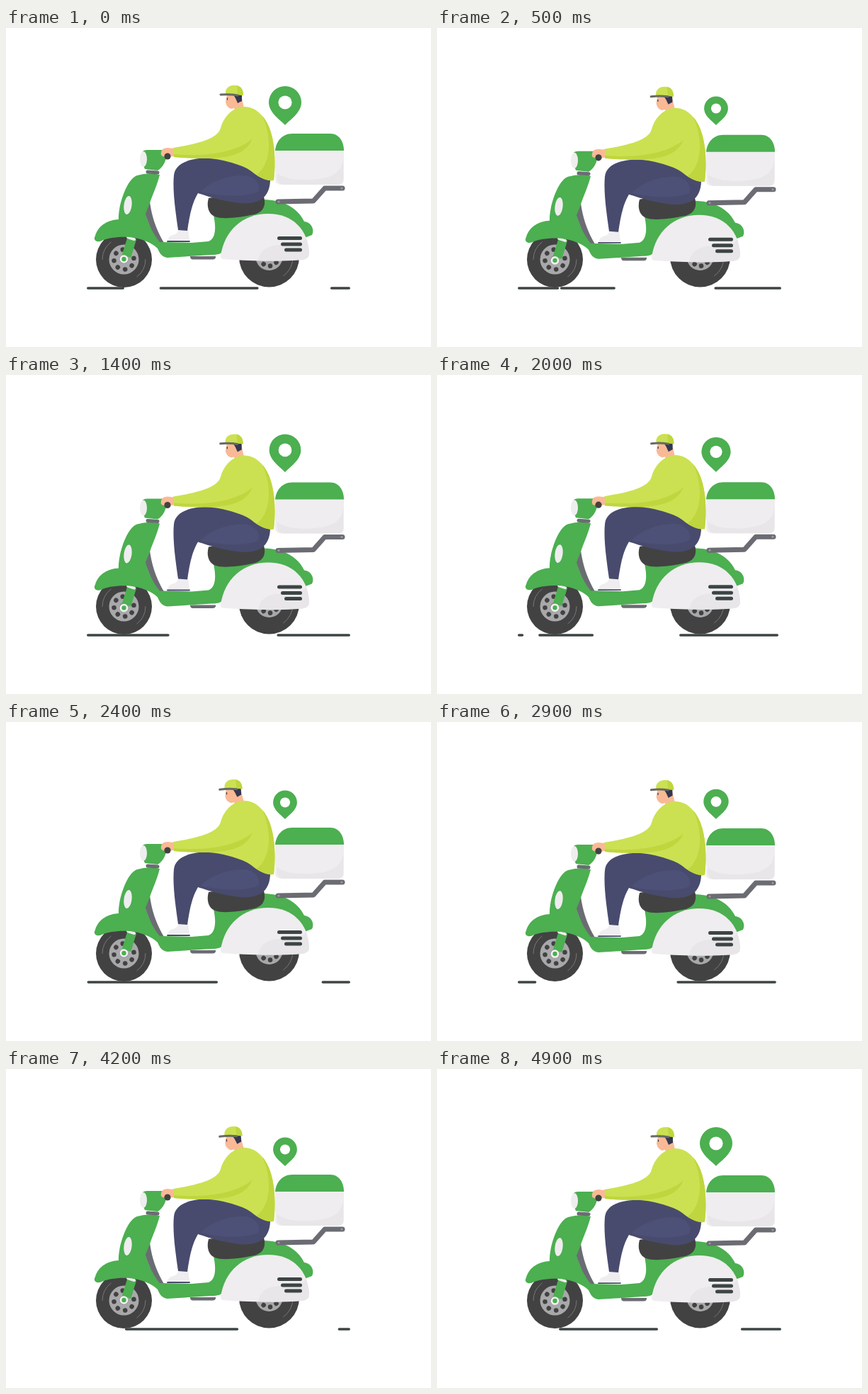
Write an HTML page that moves like this. It is 600 px wide and 450 px high and loops after 5000 ms.

```html
<!DOCTYPE html>
<html lang="en">
<head>
<meta charset="utf-8">
<title>Scooter delivery</title>
<style>
html, body { margin: 0; width: 100%; height: 100%; overflow: hidden; background: #fff; }
svg { display: block; width: 100vw; height: 100vh; }
.green { fill: #4caf50; }
.lime { fill: #cbe152; }
.olive { fill: #bfd63e; }
.dark { fill: #424242; }
.white { fill: #efedef; }
.shade { fill: #e8e6e8; }
.skin { fill: #f9b995; }
.navy { fill: #484b6d; }
.grey { fill: #6b6c73; }
.line { fill: none; stroke-linecap: round; stroke-linejoin: round; }
</style>
</head>
<body>
<svg viewBox="0 0 600 450">
  <path id="road" class="line" stroke="#3d4544" stroke-width="3.6"/>

  <g id="rear" transform="translate(371.5 323)"></g>
  <g id="front" transform="translate(166.5 326.5)"></g>

  <g id="pin" class="green">
    <path d="M394 137C389 131 371 120 371 105A23 23 0 0 1 417 105C417 120 399 131 394 137Z"/>
    <circle cx="394" cy="105" r="9.6" fill="#fff"/>
  </g>

  <g id="bike">
    <!-- box -->
    <path class="white" d="M380 172H477V213Q477 221 468 221H389Q380 221 380 213Z"/>
    <path class="shade" d="M476 179C477 200 466 212 430 214C408 215 392 212 383 205C381 215 386 221 392 221H468Q477 221 476 213Z"/>
    <path class="green" d="M380 173C381 160 390 149 404 149H458C470 149 477 160 477 173Z"/>

    <!-- fork -->
    <path stroke="#4caf50" stroke-width="13" d="M178 296L170 322"/>
    <path class="line" stroke="#efedef" stroke-width="4" d="M172 295L181 298"/>
    <circle cx="166.5" cy="326" r="4.5" fill="#4caf50" stroke="#f4f4f4" stroke-width="2.6"/>

    <!-- body -->
    <path class="grey" d="M260 322H296V324Q295 326.500 292 326.500H263Q260 326 260 322Z"/>
    <path class="grey" d="M203 245L196 262L212 303H223C213 286 206 268 203 245Z"/>
    <path class="green" d="M185 208Q202 203 217 207C214 220 207 235 203 247L197 262C201 277 208 291 217 302L262 303L286 301C296 297 297 282 293 264L340 250L365 242C392 243 412 254 421 273C431 274 436 284 432 292L424 295L400 305L310 312C304 319 299 320 290 320L228 324C220 323 217 318 214 311C205 302 190 297 175 295C158 294 143 296 133 301C126 302 123 298 126 293C131 277 145 271 159 270C158 252 170 213 185 208Z"/>
    <path class="line" stroke="#6b6c73" stroke-width="5" d="M200 203L214 204"/>
    <path class="green" d="M193 174Q195 172 199 172H221Q229 174 227 181C224 191 221 197 214 201L196 199Q190 186 193 174Z"/>
    <ellipse class="white" cx="194" cy="185" rx="5" ry="11"/>
    <ellipse class="white" cx="172" cy="250" rx="5.500" ry="13" transform="rotate(7 172 250)"/>
    <path class="white" d="M303 322C308 285 335 262 370 262C405 262 427 285 428 318Q428 326 418 327C380 329 340 329 306 326Q303 325 303 322Z"/>
    <path class="shade" d="M424 296C426 304 428 312 428 318Q428 326 418 327C395 329 375 329 356 328C359 312 372 306 388 306C407 306 419 305 424 296Z"/>
    <path class="line" stroke="#3d4544" stroke-width="5" d="M385.500 296.500H415.500M390.500 305H415.500M395.500 313H415.500"/>

    <!-- rack -->
    <path class="line" stroke="#6b6c73" stroke-width="7" d="M384 245L434 244L450 226H475"/>
    <circle cx="474" cy="226" r="1.6" fill="#999"/>
    <circle cx="385" cy="245" r="1.6" fill="#999"/>

    <!-- seat, leg, shoe -->
    <path class="dark" d="M286 240C300 236 350 240 364 238C368 252 362 262 345 264C325 268 305 270 295 266C285 262 283 250 286 240Z"/>
    <path class="white" d="M244 283H257L259 299L229 300Q228 294 236 292Q243 290 244 283Z"/>
    <path class="line" stroke="#484b6d" stroke-width="1.8" d="M228 301H259"/>
    <path class="navy" d="M297 184C268 182 239 187 237 208C235 228 239 258 243 285L256 286C259 266 262 248 271 233C287 238 300 243 330 247C352 249 372 243 373 215L340 188Z"/>
    <path fill="#4e5177" d="M275 231C288 216 315 207 338 208C352 210 360 221 356 231C335 240 300 237 275 231Z"/>

    <g id="head">
      <path class="skin" d="M312 94L310 104Q311 112 318 114L322 113L324 119L336 113L332 94Z"/>
      <path fill="#343750" d="M321 94H333V103L327 106L324 99Z"/>
      <path class="line" stroke="#343750" stroke-width="1.3" d="M312.500 99V101"/>
      <path class="lime" d="M310 93C309 84 317 80 324 81C333 82 335 88 335 95Z"/>
      <path class="olive" d="M326 81C333 83 335 88 335 95L327 94Z"/>
      <path class="line" stroke="#666b61" stroke-width="3" d="M303 94Q316 93 327 95"/>
    </g>

    <!-- shirt and hand -->
    <path class="lime" d="M333 111C318 114 307 126 303 141C299 156 273 163 236 169L237 182C262 185 280 182 296 185C315 188 340 195 350 205C358 211 368 216 378 215C381 190 381 150 365 128C356 115 345 110 333 111Z"/>
    <path class="olive" d="M362 124C381 146 381 190 378 215C368 216 360 212 354 207C374 192 376 156 362 124ZM237 178C280 182 325 176 348 156C338 181 308 188 237 182Z"/>
    <path class="skin" d="M219 175Q220 169 228 169L237 170V181L226 182Q217 182 219 175Z"/>
    <circle class="dark" cx="228" cy="181" r="4.6"/>
  </g>
</svg>
<script>
const LOOP = 5000, STEP = 100, CYCLES = 3, BUMPS = 17;
const LEFT = 114, RIGHT = 486, CAP = 1.8;
const $ = id => document.getElementById(id);

// Each dash crosses the road once per cycle; bend > 0 eases out, bend < 0 eases in.
const dashes = [
  { length: 140, start: .6, span: 1, from: -141, dist: 627, bend: .71 },
  { length: 78, start: 0, span: 1.08, from: 89, dist: 409, bend: -.35 },
  { length: 140, start: .15, span: .78, from: -40, dist: 555, bend: -.4 }
];

function smoothstep(a, b, x) {
  const u = Math.min(1, Math.max(0, (x - a) / (b - a)));
  return u * u * (3 - 2 * u);
}

function buildWheel(id, r, hub) {
  let holes = "";
  for (let i = 0; i < 8; i++)
    holes += `<circle class="dark" cx="${hub * .67}" r="3.3" transform="rotate(${i * 45 + 38})"/>`;
  const q = r - 9;
  $(id).innerHTML = `<circle class="dark" r="${r}"/>
    <path class="line" stroke="#777" d="M${q} 0A${q} ${q} 0 0 1 ${q * .6} ${q * .8}M${-q} 0A${q} ${q} 0 0 1 ${-q * .6} ${-q * .8}"/>
    <circle r="${hub}" fill="#a8a8aa"/>${holes}<circle r="6" fill="#8b8b8d"/>`;
}
buildWheel("rear", 42.5, 19);
buildWheel("front", 39.5, 21);

function roadPath(phase) {
  let d = "";
  for (const { length, start, span, from, dist, bend } of dashes)
    for (const turn of [0, 1]) {
      const u = (phase + turn - start) / span;
      if (u < 0 || u > 1) continue;
      const x = from + dist * (u + bend * u * (1 - u));
      const x0 = Math.max(x, LEFT) + CAP, x1 = Math.min(x + length, RIGHT) - CAP;
      if (x1 > x0) d += `M${x0} 367H${x1}`;
    }
  return d;
}

function draw(now) {
  const time = Math.floor(now % LOOP / STEP) * STEP / LOOP;
  const phase = time * CYCLES % 1;
  const scale = .735 + .265 * smoothstep(.4, .75, Math.abs(2 * phase - 1));
  const dip = 2.5 * Math.max(0, Math.cos(2 * Math.PI * (time * BUMPS - .76))) ** 4;
  const tilt = 1.8 * (Math.cos(2 * Math.PI * phase) - 1);

  $("road").setAttribute("d", roadPath(phase));
  $("pin").setAttribute("transform", `translate(394 137) scale(${scale}) translate(-394 -137)`);
  $("bike").setAttribute("transform", `translate(0 ${dip})`);
  $("head").setAttribute("transform", `rotate(${tilt} 324 116)`);
  requestAnimationFrame(draw);
}
requestAnimationFrame(draw);
</script>
</body>
</html>
```
